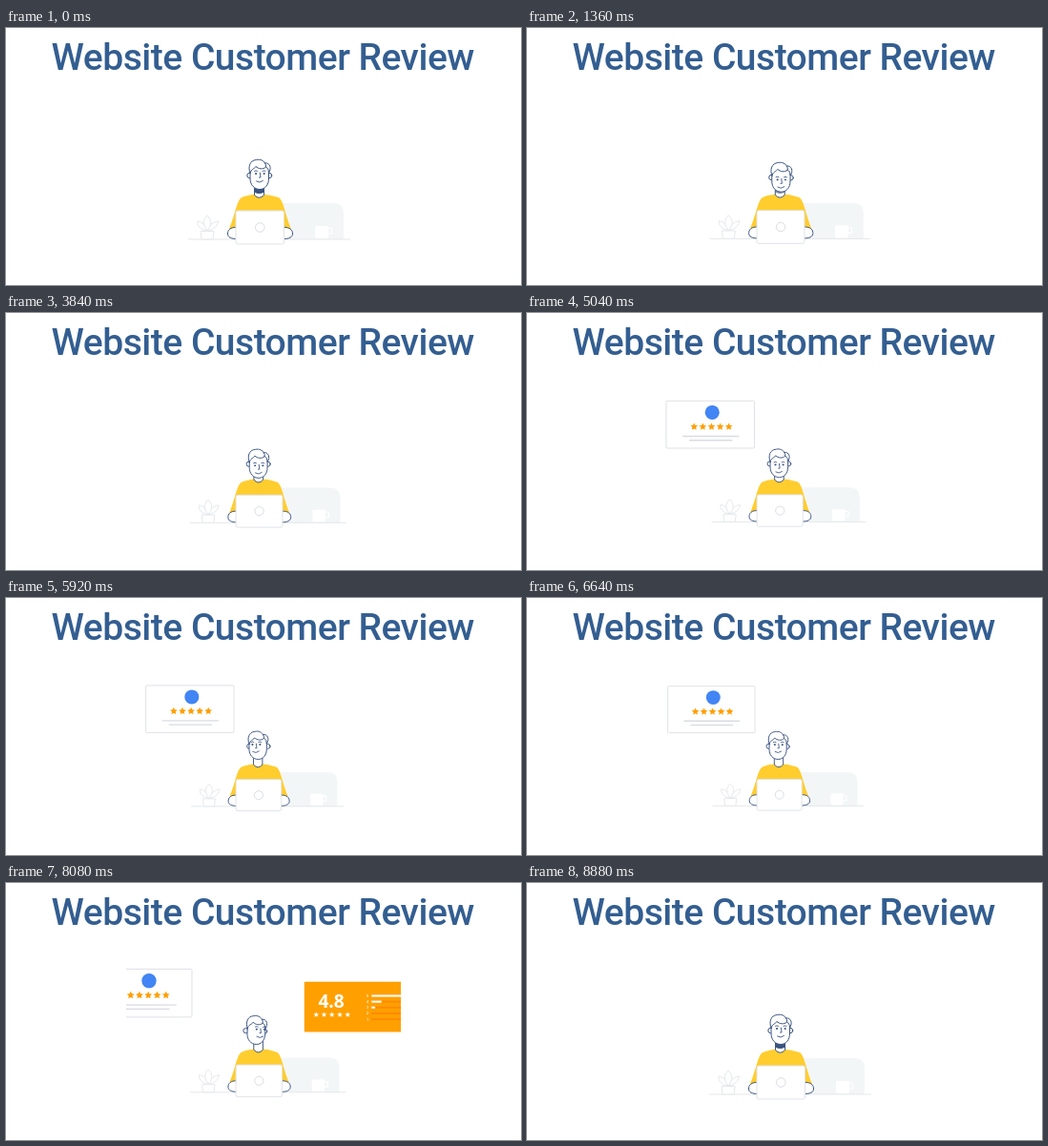
Write an HTML page that moves like this. It is 540 by 270 pixels and loops after 9.48 s.

```html
<!DOCTYPE html>
<html lang="en">
<head>
<meta charset="utf-8">
<title>Website Customer Review</title>
<style>
  html, body { margin: 0; width: 100%; height: 100%; overflow: hidden; background: #fff; }
  svg { display: block; width: 100%; height: 100%; }
  .title { font: 500 39px Roboto, Arial, sans-serif; letter-spacing: -.5px; fill: #335e91; }
  .score { font: 700 20px "Open Sans", "Noto Sans", sans-serif; fill: #fff; text-anchor: middle; }
  .row { font: 600 4px "Open Sans", "Noto Sans", sans-serif; fill: #fff; text-anchor: middle; }
  .ink { fill: #fff; stroke: #3a5380; stroke-width: 1; stroke-linecap: round; stroke-linejoin: round; }
  .line { fill: none; }
  .pale { fill: #fff; stroke: #e4e7eb; stroke-width: 1; stroke-linejoin: round; }
</style>
</head>
<body>
<svg viewBox="0 0 540 270">
  <clipPath id="stage"><rect x="126" y="89" width="288" height="162"/></clipPath>
  <text class="title" x="47.5" y="44">Website Customer Review</text>

  <g clip-path="url(#stage)">
    <g id="scene">
      <path fill="#f3f6f7" d="M268 222V184H343Q354 184 354 195V222Z"/>
      <path class="pale" d="M191 222H361"/>
      <path fill="#fff" d="M324 208H338V219Q338 221 336 221H326Q324 221 324 219Z"/>
      <path class="line" stroke="#fff" stroke-width="1.2" d="M338 210.5H341.5V216H338"/>
      <g class="pale">
        <path d="M211 213C203 212 200 207 201 203C206 204 209 207 211 213Z"/>
        <path d="M211 213C219 212 222 207 222.500 203C217 204 213 207 211 213Z"/>
        <path d="M211 213C206 207 206 202 211 197C216 202 216 207 211 213Z"/>
        <path d="M204 213.500H218L217 222H205Z"/>
      </g>

      <g id="reviewCard">
        <rect x="-49" y="-26.300" width="98" height="52.600" rx="1" fill="#fff" stroke="#dde0e5"/>
        <circle cx="2.100" cy="-13.500" r="8" fill="#4285f4"/>
        <path stroke="#d9dce2" stroke-width="1.500" d="M-31 13H32M-23.500 17.500H24.500"/>
      </g>
      <g id="scoreCard">
        <rect x="-60.500" y="-27.500" width="121" height="55" rx="1" fill="#ffa000"/>
        <text class="score" id="score" x="-31" y=".5"></text>
      </g>

      <path fill="#ffcd2e" d="M247 178C242 181 240 197 234 211L241 215V222H292V215L299 211C293 197 291 181 286 178Q276 174.500 266 174.500T247 178Z"/>
      <path class="ink" d="M260.500 166V175.500Q265.500 181 270.500 175.500V166"/>
      <path id="shadow" fill="#3a5380" d="M260.500 168H270.500V172.500Q265.500 175.500 260.500 172.500Z"/>

      <g id="head" class="ink">
        <g id="ears">
          <circle cx="-10" cy="0" r="2.700"/>
          <circle cx="10.500" cy="0" r="2.700"/>
        </g>
        <path d="M-9.500 -9V3C-9.500 10 -5 14.500 .5 14.500S10 10 10 3V-9Z"/>
        <path d="M-9.500 -2.500C-12 -9 -10 -16 -3 -16.500C1 -17.500 5 -15.500 6 -13C11 -14 13.500 -8 10 -3C10 -6 9 -8 7 -9C4 -6 -1 -7 -3.500 -9.500C-5 -7 -8.500 -7 -9.500 -2.500Z"/>
        <path class="line" d="M6 -13Q7.500 -11.500 7 -9"/>
        <g id="face" class="line" stroke-width=".9">
          <path d="M-5 -4.700Q-3.500 -5.500 -2 -4.700M3.500 -4.700Q5 -5.500 6.500 -4.700"/>
          <path d="M.8 -3L1.500 2H0M-3 6Q.5 8.500 4 5.500"/>
          <circle cx="-3.500" cy="-2" r=".6" fill="#3a5380"/>
          <circle cx="5" cy="-2" r=".6" fill="#3a5380"/>
        </g>
      </g>

      <path class="ink" d="M242 209.500C235 209 232.500 212.500 232.500 216C232.500 220 236 221.500 242 221.500"/>
      <path class="ink" d="M291 209.500C298 209 300.500 212.500 300.500 216C300.500 220 297 221.500 291 221.500"/>
      <rect x="241" y="192" width="50.500" height="35" rx="2" fill="#fff" stroke="#dfe2e8"/>
      <circle cx="266.300" cy="209.500" r="4.800" fill="none" stroke="#d9dce3"/>
    </g>
  </g>
</svg>

<script>
const LOOP = 9480, STEP = 80, LAST = 8880;
const PIVOT = [243, 169];
const BAR_LENGTHS = [32.5, 10.8, 4, 0, 0];

// time, zoom
const ZOOM = [[0, 1], [3840, .968], [7360, .923], [8880, 1]];
// time, head x, head y, tilt, look x, look y, chin shadow
const HEAD = [
  [0, 0, 0, 0, 0, 0, 1],
  [900, 0, 3, 0, 0, 3.5, .6],
  [2560, 5, 1.5, 5, -1, 3.5, 1],
  [3840, -.4, 4, 0, 0, 3, 0],
  [4880, -.4, 4, 0, 0, 3, 0],
  [5520, -.3, 0, 0, -2.5, 0, 0],
  [6400, -.3, 0, 0, -2.5, 0, 0],
  [6960, -2.5, 0, 2, 4, 0, 0],
  [8240, -2.5, 0, 2, 4, 0, 0],
  [8800, 0, 0, 0, 0, 0, 1]
];

const $ = id => document.getElementById(id);
const progress = (t, start, duration) => Math.min(1, Math.max(0, (t - start) / duration));
const linear = u => u;
const smooth = u => u * u * (3 - 2 * u);
const easeOut = u => 1 - (1 - u) ** 3;

function sample(keys, t, ease) {
  let i = 1;
  while (i < keys.length - 1 && keys[i][0] < t) i++;
  const [a, b] = [keys[i - 1], keys[i]];
  const u = ease(progress(t, a[0], b[0] - a[0]));
  return a.slice(1).map((v, k) => v + (b[k + 1] - v) * u);
}

function add(parent, tag, attributes) {
  const node = document.createElementNS("http://www.w3.org/2000/svg", tag);
  for (const name in attributes) node.setAttribute(name, attributes[name]);
  return parent.appendChild(node);
}

function addStars(parent, x, y, gap, radius, fill) {
  for (let i = 0; i < 5; i++) {
    const points = Array.from({ length: 10 }, (_, k) => {
      const r = k % 2 ? radius * .48 : radius, a = k * Math.PI / 5;
      return [x + i * gap + r * Math.sin(a), y - r * Math.cos(a)].map(v => v.toFixed(2));
    });
    add(parent, "polygon", { points: points.join(" "), fill });
  }
}

addStars($("reviewCard"), -18, 2.4, 9.65, 4.3, "#ff9e00");
addStars($("scoreCard"), -47.5, 8.7, 8.6, 3, "#fff");

const bars = BAR_LENGTHS.map((length, i) => {
  const y = -12 + i * 6.4, card = $("scoreCard");
  add(card, "text", { class: "row", x: 8.6, y: y + 1.5 }).textContent = 5 - i;
  add(card, "rect", { x: 13, y: y - 1, width: 37, height: 2, fill: "#ff8a00" });
  return add(card, "rect", { x: 13, y: y - 1.1, width: 0, height: 2.2, fill: "#fff" });
});

function placeCard(id, t, { x, y, rise, enter, leave, duration, exit }) {
  const e = easeOut(progress(t, enter, 400));
  const dx = exit * smooth(progress(t, leave, duration));
  const visible = t > enter && t < leave + duration;
  $(id).setAttribute("visibility", visible ? "visible" : "hidden");
  $(id).setAttribute("transform",
    `translate(${x + dx} ${y + rise * (1 - e)}) scale(${.38 + .62 * e})`);
}

function draw(t) {
  const [zoom] = sample(ZOOM, t, linear);
  const [px, py] = PIVOT;
  $("scene").setAttribute("transform", `translate(${px} ${py}) scale(${zoom}) translate(${-px} ${-py})`);

  const [x, y, tilt, lookX, lookY, shadow] = sample(HEAD, t, smooth);
  $("head").setAttribute("transform", `translate(${265.5 + x} ${155 + y}) rotate(${tilt})`);
  $("face").setAttribute("transform", `translate(${lookX} ${lookY})`);
  $("ears").setAttribute("transform", `translate(${-lookX * .3} ${-lookY * .2})`);
  $("shadow").setAttribute("opacity", shadow);

  placeCard("reviewCard", t, { x: 189.7, y: 113.4, rise: 78, enter: 4740, leave: 7760, duration: 800, exit: -130 });
  placeCard("scoreCard", t, { x: 359.8, y: 128.4, rise: -64, enter: 6640, leave: 7920, duration: 720, exit: 130 });

  const count = easeOut(progress(t, 6800, 700));
  $("score").textContent = (4.8 * count).toFixed(1);
  bars.forEach((bar, i) => bar.setAttribute("width", BAR_LENGTHS[i] * count));
}

function frame() {
  const t = performance.now() % LOOP;
  draw(Math.min(LAST, Math.floor(t / STEP) * STEP));
  requestAnimationFrame(frame);
}
frame();
</script>
</body>
</html>
```
